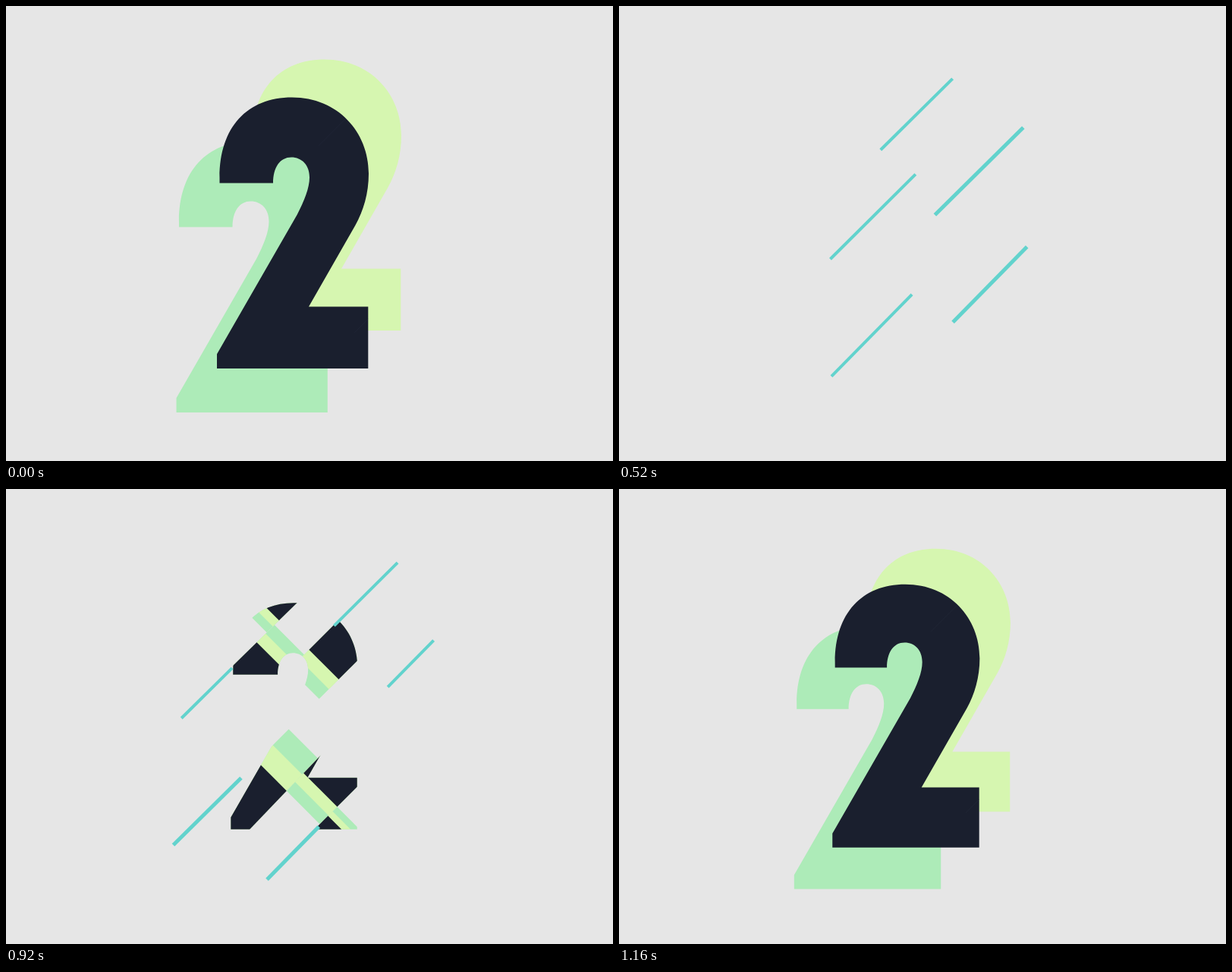
These frames come from a looping animation (800x600 px, 1200 ms). An HTML page with a canvas:

```html
<!DOCTYPE html>
<html lang="en">
<head>
<meta charset="utf-8">
<title>Number two</title>
<style>
  html, body { margin: 0; width: 100%; height: 100%; overflow: hidden; background: #e6e6e6; }
  canvas { display: block; }
</style>
</head>
<body>
<canvas id="stage" width="800" height="600"></canvas>
<script>
const ctx = document.getElementById('stage').getContext('2d');
const LOOP = 1200, STEP = 40;
const BG = '#e6e6e6', NAVY = '#1a1f2e', GREEN = '#adebb8', LIME = '#d6f6b0', TEAL = '#62d3cd';
const PIVOT = [389, 301.3];

const two = new Path2D(`M281.5 233.5 V226 C281.5 160 318 120.5 377 120.5
  C437 120.5 478 166 478 221 C478 247 471 270 460.5 289 L399 396.4 H477.3 V478 H278 V459
  L383.8 275 C393 257 400 240 400 226 C400 210 390 199.5 376 199.5
  C361 199.5 352 213 352 233.5 Z`);

// Diagonal coordinates: u = x - y runs up-right, v = x + y runs across the strips.
// Strip edges are v = base + tilt * u.
const edges = [[-900, 0], [-189.3, .01], [-94.5, 0], [-1, 0], [89.8, -.022], [197.8, 0], [900, 0]];
// Start of the wipe and its signed travel along u, one per strip.
const wipes = [[174, -174], [-32, 252], [209, -280], [-285, 457], [-4, -250], [-155, 131]];
// Colour, start time, progress at 920 ms, acceleration.
const layers = [[GREEN, 660, .54, 1.5], [LIME, 700, .43, 1.7], [NAVY, 740, .32, 2]];

const headTimes = [360, 680, 920, 1000];
const tailTimes = [360, 680, 920, 1040];
const lines = [
  { v: 533.8, tilt: .005, w: 4, head: [403, -18, -71, -190], tail: [420, 258, 62, -190] },
  { v: 612.3, tilt: .002, w: 4, head: [-82, 350, 419, 521], tail: [-99, 2, 252, 521] },
  { v: 691.2, tilt: .005, w: 5, head: [482, -118, -249, -358], tail: [497, 234, -71, -358] },
  { v: 766.5, tilt: -.009, w: 4, head: [-185, 179, 364, 496], tail: [-245, -156, 242, 496] },
  { v: 857.3, tilt: -.01, w: 5, head: [294, -150, -171, -279], tail: [306, 130, -33, -279] }
];

const sizeTimes = [880, 920, 1080, 1160, 1200, 1320, 1360];
const sizes = [.835, .835, .9035, .9705, 1, .926, .926];
const spreadTimes = [1080, 1120, 1160, 1200, 1320, 1360];
const spreads = [0, .74, .972, 1, 0, 0];

// Smooth monotone curve through the given points.
function curve(t, xs, ys) {
  const last = xs.length - 1;
  if (t <= xs[0]) return ys[0];
  if (t >= xs[last]) return ys[last];
  const secant = i => (ys[i + 1] - ys[i]) / (xs[i + 1] - xs[i]);
  const slope = i => {
    if (i === 0) return secant(0);
    if (i === last) return secant(last - 1);
    const a = secant(i - 1), b = secant(i);
    return a * b <= 0 ? 0 : 2 * a * b / (a + b);
  };
  let i = 0;
  while (t >= xs[i + 1]) i++;
  const h = xs[i + 1] - xs[i], p = (t - xs[i]) / h, r = 1 - p;
  return ys[i] * (1 + 2 * p) * r * r + ys[i + 1] * p * p * (3 - 2 * p)
    + h * p * r * (slope(i) * r - slope(i + 1) * p);
}

function place(size, dx, dy) {
  ctx.translate(PIVOT[0], PIVOT[1]);
  ctx.scale(size, size);
  ctx.translate(dx - PIVOT[0], dy - PIVOT[1]);
}

function drawTwo(color, size, dx, dy) {
  ctx.save();
  place(size, dx, dy);
  ctx.fillStyle = color;
  ctx.fill(two);
  ctx.restore();
}

function drawSeams(size) {
  ctx.save();
  place(size, 0, 0);
  ctx.strokeStyle = '#222838';
  ctx.lineWidth = .7;
  ctx.beginPath();
  ctx.moveTo(447, 149.3);
  ctx.lineTo(412, 184.3);
  ctx.moveTo(477, 412.9);
  ctx.lineTo(459, 430.9);
  ctx.stroke();
  ctx.restore();
}

function fillStrip(i, from, to) {
  const v = ([base, tilt], u) => base + tilt * u;
  const top = edges[i], bottom = edges[i + 1];
  ctx.beginPath();
  ctx.moveTo(from, v(top, from));
  ctx.lineTo(to, v(top, to));
  ctx.lineTo(to, v(bottom, to));
  ctx.lineTo(from, v(bottom, from));
  ctx.fill();
}

function drawStrips(t, size) {
  ctx.save();
  place(size, 0, 0);
  ctx.clip(two);
  ctx.translate(PIVOT[0], PIVOT[1]);
  ctx.transform(.5, -.5, .5, .5, 0, 0);
  for (const [color, start, mid, power] of layers) {
    if (t <= start) continue;
    const p = mid * ((t - start) / (920 - start)) ** power;
    ctx.fillStyle = color;
    wipes.forEach(([from, travel], i) =>
      fillStrip(i, travel > 0 ? -900 : 900, from + travel * p));
  }
  ctx.restore();
}

function drawLine(t, { v, tilt, w, head, tail }) {
  const a = curve(t, headTimes, head), b = curve(t, tailTimes, tail);
  if (Math.abs(a - b) < 1) return;
  const va = v + tilt * a, vb = v + tilt * b;
  ctx.strokeStyle = TEAL;
  ctx.lineWidth = w;
  ctx.beginPath();
  ctx.moveTo((va + a) / 2, (va - a) / 2);
  ctx.lineTo((vb + b) / 2, (vb - b) / 2);
  ctx.stroke();
}

function draw(time) {
  // The story runs from 360 ms to 1560 ms, across the loop point.
  const t = time < 360 ? time + LOOP : time;
  const size = curve(t, sizeTimes, sizes);
  ctx.fillStyle = BG;
  ctx.fillRect(0, 0, 800, 600);
  if (t < 1080) {
    drawStrips(t, size);
    lines.forEach(line => drawLine(t, line));
    return;
  }
  const spread = curve(t, spreadTimes, spreads);
  if (spread > 0) {
    drawTwo(LIME, size, 43 * spread, -50 * spread);
    drawTwo(GREEN, size, -53.5 * spread, 58 * spread);
  }
  drawTwo(NAVY, size, 0, 0);
  drawSeams(size);
}

const begin = performance.now();
function tick() {
  const time = (performance.now() - begin) % LOOP;
  draw(Math.floor(time / STEP) * STEP);
  requestAnimationFrame(tick);
}
tick();
</script>
</body>
</html>
```
